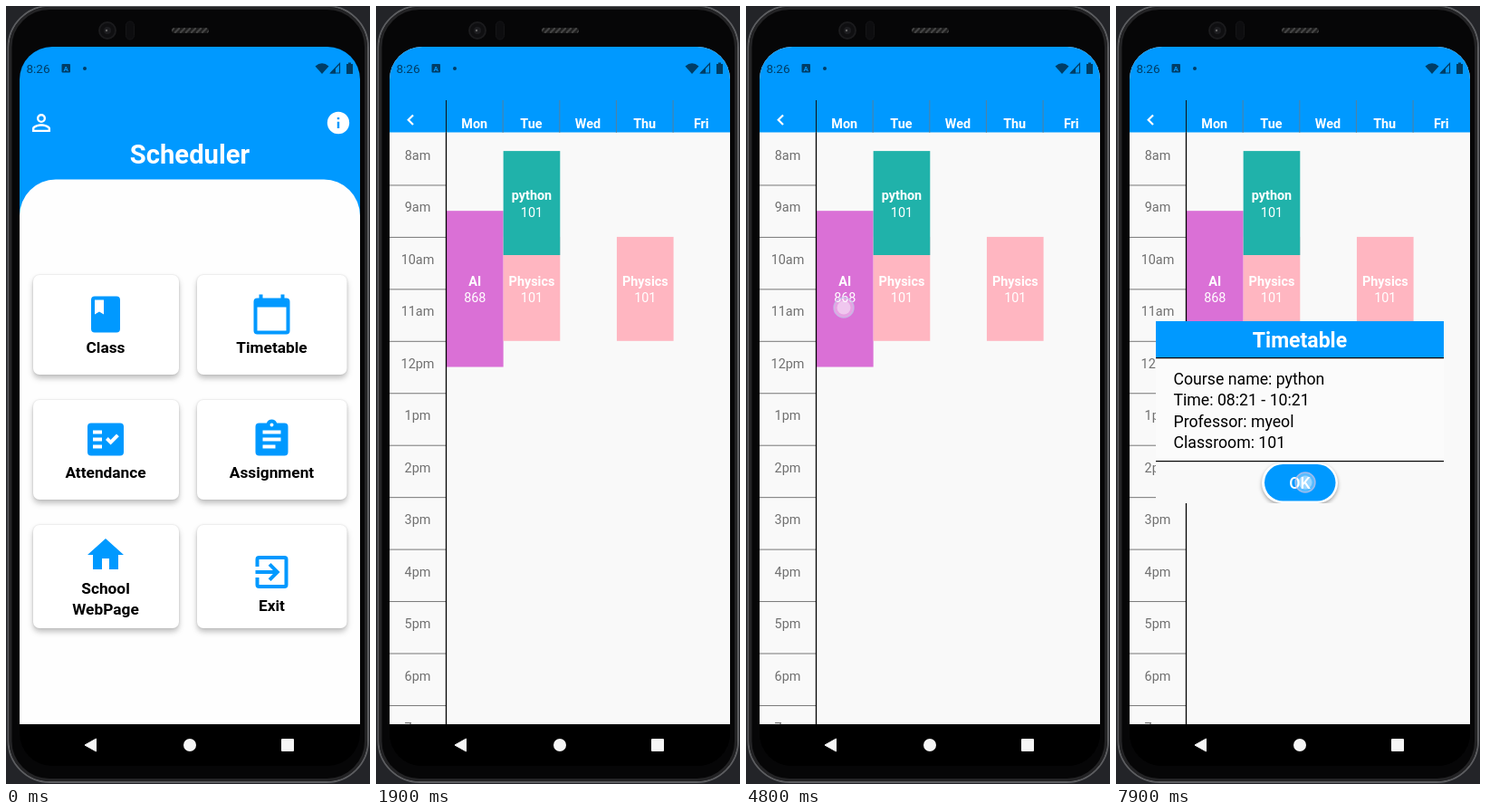
An HTML page that plays this animation: 402 px wide and 859 px high, repeating every 8000 ms.

```html
<!DOCTYPE html>
<html lang="en">
<head>
<meta charset="utf-8">
<title>Scheduler</title>
<style>
html, body { margin: 0; height: 100%; overflow: hidden; background: #232428; }
svg { display: block; width: 402px; height: 859px; font: 14.4px Roboto, sans-serif; }
.mid { text-anchor: middle; }
.bold { font-weight: 700; }
.card { fill: #fff; filter: drop-shadow(0 4px 3px rgba(0,0,0,.22)) drop-shadow(0 0 1px rgba(0,0,0,.15)); }
.lift { fill: #fff; filter: drop-shadow(0 2px 2px rgba(0,0,0,.35)); }
</style>
</head>
<body>
<svg viewBox="0 0 402 859">
  <defs>
    <clipPath id="screen"><rect x="15" y="45" width="376" height="794" rx="36"/></clipPath>
    <clipPath id="body"><rect x="15" y="139.5" width="376" height="653.5"/></clipPath>
    <clipPath id="box"><rect x="44" y="348" width="318" height="201"/></clipPath>
    <pattern id="mesh" width="6" height="6" patternUnits="userSpaceOnUse">
      <path d="M0 6L6 0" stroke="#444" stroke-width="2"/>
    </pattern>
  </defs>

  <rect x="2.5" y="0" width="397.5" height="857" rx="46" fill="#0a0a0b" stroke="#5c5d60" stroke-width="2"/>
  <rect x="5" y="2.5" width="392.5" height="852" rx="43" fill="#060607" stroke="#232325" stroke-width="3"/>
  <circle cx="112" cy="27" r="9" fill="#0f0f11" stroke="#1b1b1d" stroke-width="2"/>
  <circle cx="112" cy="27" r="4" fill="#1d1d20"/>
  <circle cx="111" cy="27" r="1.2" fill="#666"/>
  <rect x="132.5" y="17" width="9" height="20" rx="4.5" fill="#0d0d0f" stroke="#151517"/>
  <rect x="183" y="24" width="41" height="6" rx="3" fill="#1c1c1c"/>
  <rect x="183" y="24" width="41" height="6" rx="3" fill="url(#mesh)"/>

  <g clip-path="url(#screen)">
    <rect x="15" y="45" width="376" height="794"/>
    <g id="menu"></g>
    <rect id="shade" x="15" y="45" width="376" height="794" opacity="0"/>
    <g id="table">
      <rect x="15" y="45" width="376" height="748" fill="#f9f9f9"/>
      <rect x="15" y="793" width="376" height="46"/>
      <g clip-path="url(#body)"><g id="grid"></g></g>
      <g id="head"></g>
      <path d="M77.5 140V793" stroke="#000" stroke-width="1.3"/>
    </g>
    <g id="dialog" clip-path="url(#box)"></g>

    <g fill="#003d66">
      <text x="22.5" y="74" font-size="13.5">8:26</text>
      <rect x="61.5" y="64" width="9.5" height="9.5" rx="1"/>
      <text class="mid bold" x="66.25" y="72" font-size="8" fill="#09f">A</text>
      <circle cx="87" cy="69" r="2"/>
      <path d="M341.5 66.5Q349 60 356.5 66.5L349 75Z"/>
      <path d="M358.5 74H368.5V63.5Z" fill="none" stroke="#003d66" stroke-width="1.2"/>
      <path d="M358 74.5L364 68V74.5Z"/>
      <path d="M376 64H378V62.5H381V64H383V75H376Z"/>
    </g>
    <g fill="#f6f6f6">
      <path d="M87 816L99.5 809V823Z" stroke="#f6f6f6" stroke-linejoin="round"/>
      <circle cx="203" cy="816" r="7"/>
      <rect x="304" y="809" width="14" height="14" rx="1"/>
    </g>
    <g id="touch">
      <circle r="11" fill="#fff" fill-opacity=".35" stroke="#c3bfe6" stroke-opacity=".75" stroke-width="1.5"/>
      <circle r="7.5" fill="#fff" fill-opacity=".4"/>
    </g>
  </g>
</svg>
<script>
const $ = id => document.getElementById(id);
const BLUE = '#0099ff', ROW = 57.45, COL = 62.65;

const text = (s, x, y, cls = '', attrs = '') =>
  `<text x="${x}" y="${y}" class="${cls}" ${attrs}>${s}</text>`;
const rect = (x, y, w, h, attrs = '') =>
  `<rect x="${x}" y="${y}" width="${w}" height="${h}" ${attrs}/>`;
const icon = (d, x, y, scale = 2, fill = BLUE) =>
  `<path transform="translate(${x} ${y}) scale(${scale}) translate(-12 -12)" d="${d}" fill="${fill}" fill-rule="evenodd"/>`;

// Path pieces on a 24-unit grid
const disc = (x, y, r) => `M${x - r} ${y}a${r} ${r} 0 1 0 ${2 * r} 0a${r} ${r} 0 1 0 ${-2 * r} 0z`;
const bar = (x, y, w, h = 2) => `M${x} ${y}h${w}v${h}h${-w}z`;
const round = (x, y, w, h, r = 2) =>
  `M${x + r} ${y}h${w - 2 * r}a${r} ${r} 0 0 1 ${r} ${r}v${h - 2 * r}a${r} ${r} 0 0 1 ${-r} ${r}` +
  `h${2 * r - w}a${r} ${r} 0 0 1 ${-r} ${-r}v${2 * r - h}a${r} ${r} 0 0 1 ${r} ${-r}z`;

const ICONS = {
  person: disc(12, 8, 4) + disc(12, 8, 2.1) +
    'M12 13c-2.67 0-8 1.34-8 4v3h16v-3c0-2.66-5.33-4-8-4zm0 1.9c2.97 0 6.1 1.46 6.1 2.1v1.1H5.9V17c0-.64 3.13-2.1 6.1-2.1z',
  info: disc(12, 12, 10) + bar(11, 7, 2) + bar(11, 11, 2, 6),
  book: round(4, 2, 16, 20) + 'M6 4h5v8l-2.5-1.5L6 12z',
  calendar: round(2, 3, 20, 20) + bar(4, 8, 16, 13) + 'M5 3V1h2v2zM17 3V1h2v2z' + bar(7, 3, 10, 0),
  check: round(2, 3, 20, 18) + [7, 11, 15].map(y => bar(5, y, 5)).join('') +
    'M14.8 15L12 12.2l1.4-1.4 1.4 1.4L18 9l1.4 1.4z',
  clip: 'M19 3h-4.18a3 3 0 0 0-5.64 0H5a2 2 0 0 0-2 2v14a2 2 0 0 0 2 2h14a2 2 0 0 0 2-2V5a2 2 0 0 0-2-2z' +
    disc(12, 4, 1) + bar(7, 7, 10) + bar(7, 11, 10) + bar(7, 15, 7),
  home: 'M10 20v-6h4v6h5v-8h3L12 3 2 12h3v8z',
  exit: 'M10.1 15.6L11.5 17l5-5-5-5-1.4 1.4 2.6 2.6H3v2h9.7z' +
    'M19 3H5a2 2 0 0 0-2 2v4h2V5h14v14H5v-4H3v4a2 2 0 0 0 2 2h14a2 2 0 0 0 2-2V5a2 2 0 0 0-2-2z'
};

// icon, vertical shift, label lines; two cards per row
const CARDS = [
  ['book', 0, 'Class'], ['calendar', 0, 'Timetable'],
  ['check', 0, 'Attendance'], ['clip', 0, 'Assignment'],
  ['home', -10.5, 'School', 'WebPage'], ['exit', 8.5, 'Exit']
];

function buildMenu() {
  const cards = CARDS.map(([name, shift, ...lines], i) => {
    const right = i % 2, row = i >> 1, top = 297 + 138 * row, cx = right ? 293.5 : 110;
    return rect(right ? 211 : 30, top, right ? 165.5 : 161, row > 1 ? 114 : 110, 'rx="7" class="card"') +
      icon(ICONS[name], cx, top + 43.5 + shift) +
      lines.map((s, k) => text(s, cx, top + 86 + shift + 23 * k, 'mid bold', 'font-size="17.3"')).join('');
  });
  $('menu').innerHTML =
    rect(15, 45, 376, 748, `fill="${BLUE}"`) +
    '<path d="M15 793V231.5A40 40 0 0 1 55 191.5H351A40 40 0 0 1 391 231.5V793Z" fill="#fefefe"/>' +
    icon(ICONS.person, 39, 129, 1.25, '#fff') + icon(ICONS.info, 367, 129, 1.22, '#fff') +
    text('Scheduler', 203, 174, 'mid bold', 'font-size="29.2"') .replace('<text', '<text fill="#fff"') +
    cards.join('');
}

// day column, start hour, end hour, name, room, colour
const LESSONS = [
  [0, 9.5, 12.5, 'AI', 868, '#da70d6'],
  [1, 10, 12, 'Physics', 101, '#ffb6c1'],
  [3, 10, 12, 'Physics', 101, '#ffb6c1'],
  [1, 8.35, 10.35, 'python', 101, '#20b2aa']
];
const hourY = h => 140 + (h - 8) * ROW;

function buildTable() {
  let grid = '';
  for (let h = 8; h < 22; h++) {
    const label = (h > 12 ? h - 12 : h) + (h < 12 ? 'am' : 'pm');
    grid += text(label, 46, hourY(h) + 30, 'mid', 'fill="#707070"') +
      rect(15, hourY(h + 1), 62, 1, 'fill="#777"');
  }
  for (const [day, from, to, name, room, color] of LESSONS) {
    const x = 78 + day * COL, y = hourY(from), mid = (y + hourY(to)) / 2, cx = x + COL / 2;
    grid += rect(x, y, COL, hourY(to) - y, `fill="${color}"`) +
      text(name, cx, mid - 3.7, 'mid bold', 'fill="#fff"') +
      text(room, cx, mid + 15, 'mid', 'fill="#fff"');
  }
  $('grid').innerHTML = grid;
  $('head').innerHTML = rect(15, 45, 376, 94.5, `fill="${BLUE}"`) +
    '<path d="M41 120.5L35.7 125.7L41 131" fill="none" stroke="#fff" stroke-width="2.2"/>' +
    ['Mon', 'Tue', 'Wed', 'Thu', 'Fri'].map((d, i) =>
      rect(77 + i * COL, 104, 1, 36, i ? 'fill="#777" opacity=".7"' : 'fill="#111"') +
      text(d, 108.7 + i * COL, 135, 'mid bold', 'fill="#fff"')).join('');
}

function buildDialog(course, time, room) {
  const lines = ['Course name: ' + course, 'Time: ' + time, 'Professor: myeol', 'Classroom: ' + room];
  $('dialog').innerHTML = rect(44, 348, 318, 201, 'fill="#f9f9f9"') +
    rect(44, 389, 318, 113, 'fill="#fbfbfb"') +
    rect(44, 348, 318, 40.5, `fill="${BLUE}"`) +
    rect(44, 388, 318, 1.2) + rect(44, 502, 318, 1.2) +
    text('Timetable', 203, 377, 'mid bold', 'font-size="23" fill="#fff"') +
    lines.map((s, i) => text(s, 63.5, 418 + 23.3 * i, '', 'font-size="17.7"')).join('') +
    rect(161, 504, 84, 45, 'rx="22.5" class="lift"') +
    rect(164, 506, 78.5, 40.5, `rx="20.25" fill="${BLUE}"`) +
    text('OK', 203, 533, 'mid', 'font-size="17.7" font-weight="500" fill="#fff"');
}

const ramp = (t, from, to) => Math.min(1, Math.max(0, (t - from) / (to - from)));
const mix = (a, b, k) => a + (b - a) * k;

// x, y, start
const TAPS = [[298, 360, 1100], [108, 333, 4800], [204, 530, 5800], [172, 190, 6800], [209, 526, 7800]];
// time, finger x, finger y, scroll offset
const DRAG = [
  [3200, 217, 503, 0], [3400, 222, 264, 146], [3500, 222, 167, 152],
  [3800, 230, 270, 150], [4000, 237, 389, 109.7], [4200, 241, 562, 0]
];

function dragAt(t) {
  const i = Math.max(1, DRAG.findIndex(k => k[0] >= t));
  const a = DRAG[i - 1], b = DRAG[i];
  return a.map((v, n) => mix(v, b[n], ramp(t, a[0], b[0])));
}

function fingerAt(t, [, dragX, dragY]) {
  if (t >= 3200 && t < 4500) return [dragX, dragY, t < 4400 ? 1 : .5];
  const tap = TAPS.find(([, , s]) => t >= s && t < s + 300);
  return tap ? [tap[0], tap[1], t < tap[2] + 200 ? 1 : .5] : [0, 0, 0];
}

const zoom = s => `translate(203 442) scale(${s}) translate(-203 -442)`;
let second;

function draw(now) {
  const t = Math.floor(now % 8000 / 100) * 100;
  const open = t >= 1600;
  $('table').style.display = open ? '' : 'none';
  $('table').setAttribute('transform', zoom(1 - .028 * (1 - ramp(t, 1600, 1900)) ** 3));
  $('menu').style.display = t < 1900 ? '' : 'none';
  $('menu').setAttribute('transform', zoom(open ? 1.04 : 1));
  $('shade').setAttribute('opacity', open ? .07 : 0);

  const drag = dragAt(Math.min(4200, t));
  $('grid').setAttribute('transform', `translate(0 ${-drag[3]})`);

  if (second !== t >= 6500) {
    second = t >= 6500;
    if (second) buildDialog('python', '08:21 - 10:21', 101);
    else buildDialog('AI', '09:30 - 12:30', 868);
  }
  $('dialog').setAttribute('opacity', ramp(t, 4900, 5100) - ramp(t, 5900, 6100) + ramp(t, 6900, 7100));

  const [x, y, alpha] = fingerAt(t, drag);
  $('touch').setAttribute('transform', `translate(${x} ${y})`);
  $('touch').setAttribute('opacity', alpha);
}

buildMenu();
buildTable();
const start = performance.now();
(function loop() {
  draw(performance.now() - start);
  requestAnimationFrame(loop);
})();
</script>
</body>
</html>
```
